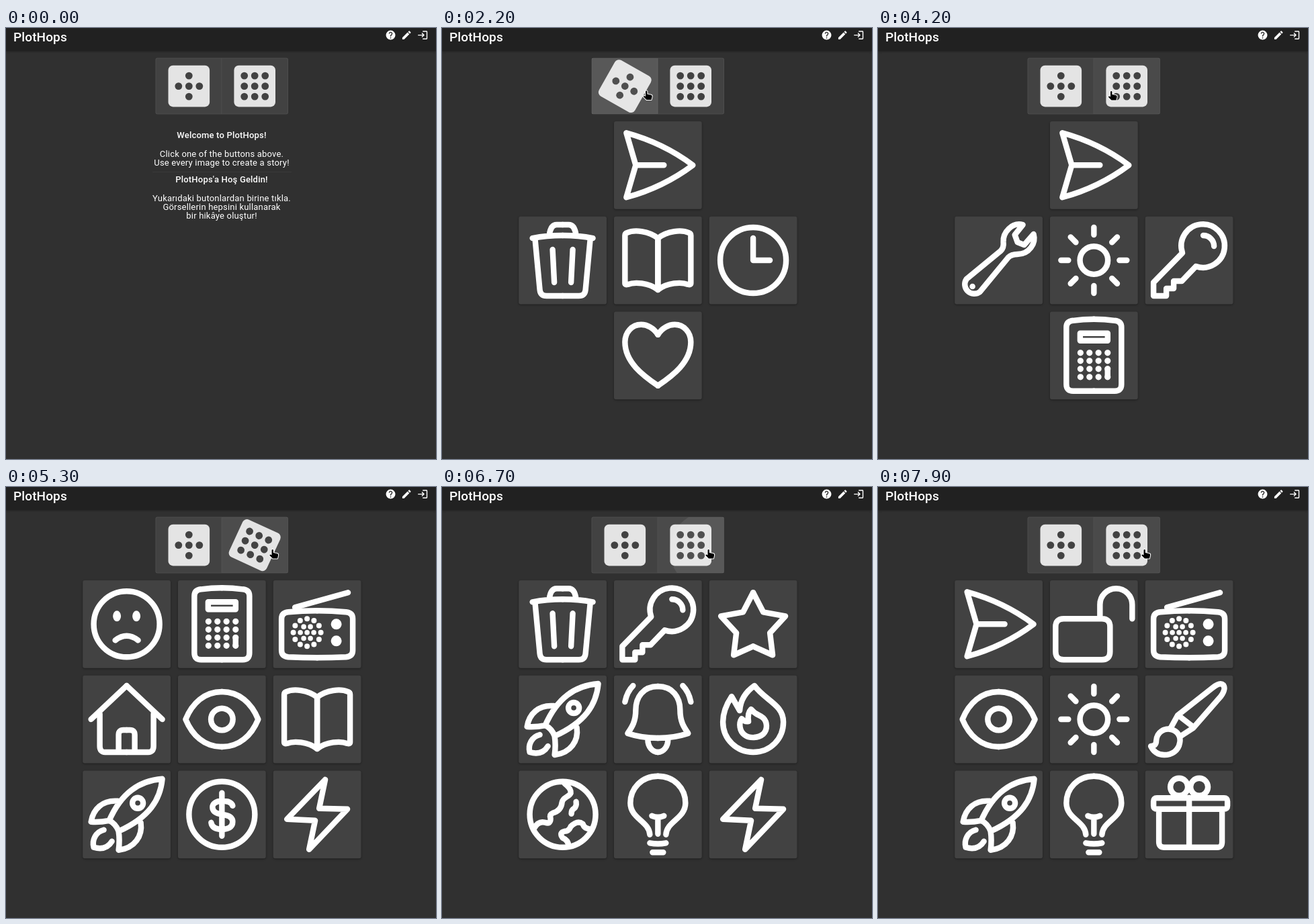
Recreate the animation shown at these times as an HTML page with a canvas. Size 640 px wide and 642 px high, loop 8000 ms.

```html
<!DOCTYPE html>
<html lang="en">
<head>
<meta charset="utf-8">
<title>PlotHops</title>
<style>
html, body { margin: 0; width: 100%; height: 100%; overflow: hidden; background: #303030; }
canvas { display: block; width: 640px; height: 642px; }
</style>
</head>
<body>
<canvas id="stage"></canvas>
<script>
const LOOP = 8000, STEP = 100, SPIN = 500;
const canvas = document.getElementById('stage');
const ctx = canvas.getContext('2d');
const ratio = window.devicePixelRatio || 1;
canvas.width = 640 * ratio;
canvas.height = 642 * ratio;

const dot = (x, y, r, ry = r) => `M${x - r} ${y}a${r} ${ry} 0 1 0 ${2 * r} 0a${r} ${ry} 0 1 0 ${-2 * r} 0Z`;
const ring = (n, x, y, radius, r) => Array.from({ length: n }, (_, i) => {
  const a = i * 2 * Math.PI / n;
  return dot(x + radius * Math.cos(a), y + radius * Math.sin(a), r);
}).join('');
const disc = dot(0, 0, 49);
const noteHead = 'h-14c-11 0-17 10-15 18c2 5 12 5 20 1q9-5 9-17';
const rays = Array.from({ length: 8 }, (_, i) => {
  const c = Math.cos(i * Math.PI / 4), s = Math.sin(i * Math.PI / 4);
  return `M${38 * c} ${38 * s}L${49 * c} ${49 * s}`;
}).join('');
const keypad = [-20, -6.6, 6.8, 20.4].map(x => [-4, 8, 20, 32].map(y => dot(x, y, 4.6)).join('')).join('');

// d: stroked, m: stroked and mirrored, f: filled. Origin is the tile centre.
const shapes = {
  send: { d: 'M-47-48Q8-33 52 0Q8 33-47 48L-33 0ZM-33 0H9' },
  trash: { m: 'M0-53H-9Q-18-53-20-37M0-37Q-24-37-45-33M-41-31L-34 44Q-33 53-24 53H0M-15-16L-12.5 33' },
  book: { m: 'M0 44V-33C-14-44-35-46-46-41Q-49-40-49-37V34Q-49 37-45 36C-35 32-14 33 0 44' },
  clock: { d: disc + 'M0-33V0H25' },
  heart: { m: 'M0-31C-6-41-16-46-25-46C-39-46-49-34-49-20C-49 10-22 30 0 45' },
  eye: { m: 'M0-41C-26-41-44-24-54 0C-44 24-26 41 0 41', d: dot(0, 0, 16.3) },
  dollar: { d: disc + 'M0-32V32M16-13C14-19 8-20 0-20C-9-20-14-16-14-11C-14-3-7-1 0 0C10 1 16 4 16 11C16 19 9 22 0 22C-9 22-15 19-16 12' },
  music: { d: 'M-15 34V-37L41-52V18M-15-19L41-34M-15 34' + noteHead + 'M41 18' + noteHead },
  lock: { d: 'M-45-8H12Q24-8 24 4V41Q24 53 12 53H-45Q-57 53-57 41V4Q-57-8-45-8ZM9-10V-29A24 24 0 0 1 57-29V-8' },
  wrench: { d: 'M36-53L24-38L28-27L38-23L52-39C56-25 45-9 28-9Q19-9 14-4L-28 47A14 14 0 0 1-48 28L3-14Q8-19 7-27C6-42 20-57 36-53Z', f: dot(-39, 39, 4.3) },
  sun: { d: dot(0, 0, 20.8) + rays },
  key: { d: 'M-10-11L-53 33V53H-34V42H-23V31H-11L10 9A32.3 32.3 0 1 0-10-11ZM21-37A16 16 0 0 1 37-21' },
  calc: { m: 'M0-54Q-16-54-31-52Q-41-51-41-42V43Q-41 53-31 53H0', d: 'M-20.5-33H20.5V-22H-20.5ZM20.4 20V32', f: keypad },
  sad: { d: disc + 'M-17 24Q0 11 17 24', f: dot(-14.5, -12, 6, 8) + dot(14.5, -12, 6, 8) },
  radio: { m: 'M0-20Q-22-20-43-18Q-53-17-53-8V39Q-53 48-43 49Q-22 50 0 50', d: 'M-33-25L46-47', f: ring(12, -15, 12.5, 20.5, 4) + ring(6, -15, 12.5, 10, 3.8) + dot(-15, 12.5, 3.8) + dot(28.5, 0, 8) + dot(28.5, 25, 8) },
  house: { m: 'M-53 0L0-50M-40-8V40Q-40 49-32 49H0M-12 47V23Q-12 16-5 16H0' },
  rocket: { d: 'M53-53C18-50-8-32-26 9Q-16 14-12 25C34 4 50-22 53-53ZM-13-20C-36-22-50-8-53 11Q-40 12-26 9M21 12C24 32 12 50-12 53Q-10 38-12 25M-34 23C-46 26-52 38-49 49C-38 52-28 50-22 40' + dot(16.5, -17, 8) },
  bolt: { d: 'M12-52L-45 7L-3 9L-12 52L45-8L3-9Z' },
  star: { m: 'M0-47L15-18L48-12L25 13L29 46L0 33' },
  bell: { m: 'M0-49C-22-49-33-33-33-14C-33 4-39 12-45 21Q-24 28 0 28M-15 30C-15 41-8 49 0 49M-37-50Q-46-41-49-26' },
  fire: { d: 'M2-50C-11-41-19-28-20-13L-32-34C-40-22-45-11-45 4C-45 30-24 49 0 49C26 49 45 29 45 4C45-22 18-28 2-50ZM-3-15C-8-10-8-4-7 3Q-13 4-17-1C-22 6-20 18-13 23C-5 29 8 28 15 22C22 15 21 4 15-2C10-7 4-6-3-15Z' },
  globe: { d: disc + 'M3-46Q13-38 12-32C10-26 0-26-1-18C-2-8-8-4-15-2Q-20 0-18 6Q-18 15-26 12Q-36 9-42 20M20-19Q21-12 17-9Q13-7 13-1M9 47Q8 38 0 35Q-6 27 3 25Q9 25 12 18Q22 8 30 14Q32 22 44 22' },
  bulb: { m: 'M0-57C-24-57-41-39-41-17C-41 6-13 10-12 30', d: 'M-12 42.5Q0 45 12 42.5M-8 56.5H8M0 29V4M-9 2Q0 6 9 2' },
  brush: { d: 'M-28 14L-17-6L35-47Q46-56 51-51Q55-45 47-34L6 13L-14 26M-15-5L7 12M-57 40Q-49 40-49 32C-48 18-36 13-27 15C-17 17-12 26-14 35C-16 47-26 53-37 53C-46 53-53 48-57 40Z' },
  gift: { d: 'M-48-24.5H52Q57-24.5 57-19.5V-13Q57-8 52-8H-48Q-53-8-53-13V-19.5Q-53-24.5-48-24.5ZM-45-8V41Q-45 49-37 49H42Q49 49 49 41V-8M0-25V49' + dot(-15, -41, 13) + dot(15, -41, 13) }
};
for (const s of Object.values(shapes)) {
  for (const k in s) s[k] = new Path2D(s[k]);
}

const five = [1, 3, 4, 5, 7], nine = [...Array(9).keys()];
const rolls = [
  [2112, five, 'send trash book clock heart'],
  [2730, five, 'eye dollar music lock book'],
  [3600, five, 'send wrench sun key calc'],
  [4500, nine, 'bell star house sun gift trash clock heart key'],
  [5027, nine, 'sad calc radio house eye book rocket dollar bolt'],
  [5600, nine, 'clock house send rocket sun heart dollar calc bolt'],
  [6200, nine, 'trash key star rocket bell fire globe bulb bolt'],
  [6710, nine, 'house book lock sad music clock bell heart gift'],
  [7330, nine, 'send lock radio eye sun brush rocket bulb gift']
].map(([at, cells, names]) => ({ at, cells, icons: names.split(' ') }));

const clamp = u => Math.max(0, Math.min(1, u));
const smooth = u => u * u * (3 - 2 * u);

// time, x, y of the pointer
const track = [[880, 5, 200], [1700, 299, 93], [2400, 299, 93], [2800, 296.5, 98], [3500, 296.5, 98],
  [3700, 299, 94], [4000, 299, 94], [4200, 342, 93.5], [4350, 391.5, 92.5]];
function pointer(t) {
  const i = track.findLastIndex(k => k[0] <= t);
  if (i < 0) return null;
  const a = track[i], b = track[i + 1] || a;
  let u = b === a ? 0 : (t - a[0]) / (b[0] - a[0]);
  if (i === 0) u = 1 - (1 - u) ** 2;
  return [a[1] + (b[1] - a[1]) * u, a[2] + (b[2] - a[2]) * u];
}

function box(x, y, w, h, r, fill) {
  ctx.beginPath();
  ctx.roundRect(x, y, w, h, r);
  ctx.fillStyle = fill;
  ctx.fill();
}

function shadow(color, blur, y) {
  ctx.shadowColor = color;
  ctx.shadowBlur = blur * ratio;
  ctx.shadowOffsetY = y * ratio;
}

function text(str, x, y, size, weight, align, spacing) {
  ctx.font = `${weight} ${size}px Roboto, sans-serif`;
  ctx.letterSpacing = spacing + 'px';
  ctx.textAlign = align;
  ctx.fillStyle = '#fff';
  ctx.fillText(str, x, y);
}

const tools = [
  [572.5, 'M12 2a10 10 0 1 0 0 20a10 10 0 1 0 0-20zm1 17h-2v-2h2zm2.07-7.75l-.9.92C13.45 12.9 13 13.5 13 15h-2v-.5c0-1.1.45-2.1 1.17-2.83l1.24-1.26c.37-.36.59-.86.59-1.41 0-1.1-.9-2-2-2s-2 .9-2 2H8c0-2.21 1.79-4 4-4s4 1.79 4 4c0 .88-.36 1.68-.93 2.25z'],
  [596.2, 'M3 17.25V21h3.75L17.81 9.94l-3.75-3.75zM20.71 7.04a1 1 0 0 0 0-1.41l-2.34-2.34a1 1 0 0 0-1.41 0l-1.83 1.83 3.75 3.75z'],
  [620.2, 'M11 7L9.6 8.4l2.6 2.6H2v2h10.2l-2.6 2.6L11 17l5-5zM20 19h-8v2h8a2 2 0 0 0 2-2V5a2 2 0 0 0-2-2h-8v2h8z']
].map(([x, d]) => [x, new Path2D(d)]);

function header() {
  ctx.save();
  shadow('rgba(0,0,0,.2)', 3, 1);
  box(0, -10, 640, 44.5, 0, '#212121');
  ctx.restore();
  text('PlotHops', 11, 20, 19, 500, 'left', 0.1);
  for (const [x, path] of tools) {
    ctx.save();
    ctx.translate(x - 8.4, 2.2);
    ctx.scale(0.7, 0.7);
    ctx.fill(path, 'evenodd');
    ctx.restore();
  }
}

function die(x, angle, spots) {
  ctx.save();
  ctx.translate(x, 86.6);
  ctx.rotate(angle);
  box(-30.8, -30.8, 61.6, 61.6, 7, '#e4e4e4');
  ctx.fillStyle = '#424242';
  for (const i of spots) {
    ctx.beginPath();
    ctx.arc((i % 3 - 1) * 15.5, (Math.floor(i / 3) - 1) * 15.5, 5.4, 0, 7);
    ctx.fill();
  }
  ctx.restore();
}

function buttons(t, pos) {
  box(222.5, 44.5, 197.5, 84, 3, '#4d4d4d');
  box(223.5, 45.5, 195.5, 82, 2, '#424242');
  ctx.fillStyle = '#4d4d4d';
  ctx.fillRect(320.3, 45, 1, 83);
  [five, nine].forEach((spots, side) => {
    const left = side ? 321 : 223, width = 98.5;
    const mine = rolls.filter(r => r.cells === spots);
    const over = pos && t >= 2000 && (pos[0] + 5 > 321) === !!side;
    if (over) {
      ctx.fillStyle = 'rgba(255,255,255,.045)';
      ctx.fillRect(left, 45, width, 83);
    }
    const last = mine.findLast(r => r.at <= t);
    const turn = last ? smooth(clamp((t - last.at) / SPIN)) : 0;
    die(side ? 370.2 : 272.3, turn * 2 * Math.PI, spots);
    ctx.save();
    ctx.beginPath();
    ctx.rect(left, 45, width, 83);
    ctx.clip();
    for (const r of mine) {
      const age = t - r.at + 100;
      if (age <= 0 || age > 400) continue;
      const [x, y] = pointer(r.at);
      ctx.globalAlpha = 0.075 * clamp((400 - age) / 200);
      ctx.fillStyle = '#fff';
      ctx.beginPath();
      ctx.arc(x + 5, y + 2, 128 * clamp(age / 200), 0, 7);
      ctx.fill();
    }
    ctx.restore();
  });
}

function welcome() {
  const line = (s, y, weight = 400) => text(s, 321, y, 13, weight, 'center', 0.19);
  line('Welcome to PlotHops!', 164, 500);
  line('Click one of the buttons above.', 191.5);
  line('Use every image to create a story!', 204.5);
  ctx.fillStyle = '#3a3a3a';
  ctx.fillRect(218, 214, 207, 1);
  line("PlotHops'a Hoş Geldin!", 230, 500);
  line('Yukarıdaki butonlardan birine tıkla.', 257.5);
  line('Görsellerin hepsini kullanarak', 270.5);
  line('bir hikâye oluştur!', 283.5);
}

function tile(cell, name) {
  const s = shapes[name];
  ctx.save();
  ctx.translate(179.6 + cell % 3 * 141.75, 204.3 + Math.floor(cell / 3) * 141.75);
  ctx.save();
  shadow('rgba(0,0,0,.4)', 3, 1);
  box(-65.4, -65.4, 130.8, 130.8, 3, '#424242');
  ctx.restore();
  ctx.strokeStyle = ctx.fillStyle = '#fff';
  ctx.lineWidth = 8.4;
  ctx.lineCap = ctx.lineJoin = 'round';
  if (s.f) ctx.fill(s.f);
  if (s.d) ctx.stroke(s.d);
  if (s.m) {
    ctx.stroke(s.m);
    ctx.scale(-1, 1);
    ctx.stroke(s.m);
  }
  ctx.restore();
}

const hand = new Path2D('M4 9V1.7a1.2 1.2 0 0 1 2.4 0V5.6l6 1.2Q14 7.3 13.6 9.5L12.5 14H5.5L1 9.5Q.5 8 2 8Z');
const arrow = new Path2D('M0 0V15L3.6 11.8L6 17L8.4 16L6.1 10.9H11Z');
function cursor([x, y]) {
  const shape = x > 220 && y < 126 ? hand : arrow;
  ctx.save();
  ctx.translate(x, y);
  ctx.lineJoin = 'round';
  ctx.strokeStyle = '#fff';
  ctx.fillStyle = '#000';
  ctx.lineWidth = 2;
  ctx.stroke(shape);
  ctx.fill(shape);
  ctx.restore();
}

function draw(t) {
  ctx.setTransform(ratio, 0, 0, ratio, 0, 0);
  ctx.fillStyle = '#303030';
  ctx.fillRect(0, 0, 640, 642);
  const pos = pointer(t);
  header();
  buttons(t, pos);
  const roll = rolls.findLast(r => r.at <= t);
  if (roll) roll.cells.forEach((cell, i) => tile(cell, roll.icons[i]));
  else welcome();
  if (pos) cursor(pos);
}

const start = performance.now();
function loop() {
  const t = (performance.now() - start) % LOOP;
  draw(Math.floor(t / STEP) * STEP);
  requestAnimationFrame(loop);
}
loop();
</script>
</body>
</html>
```
